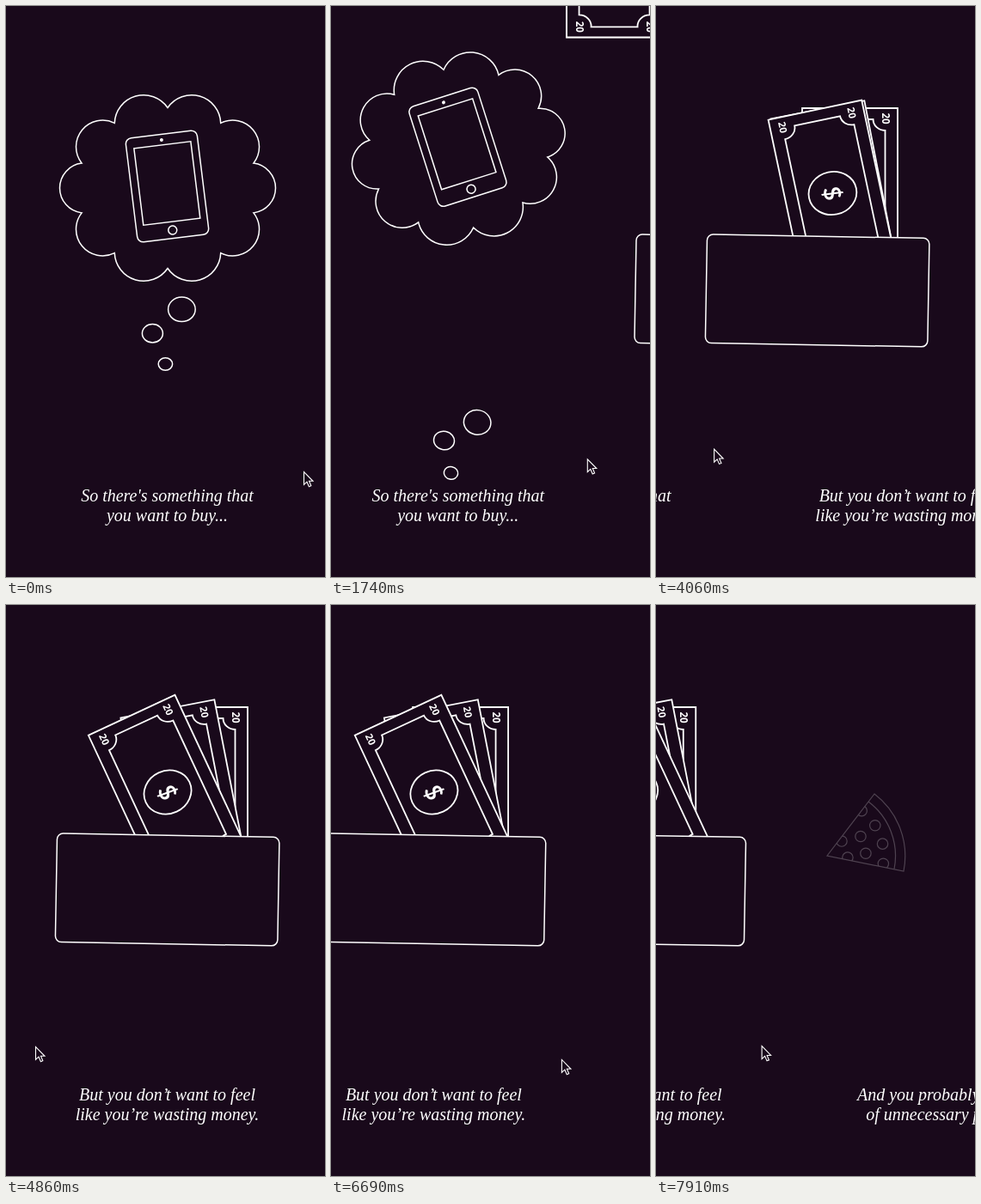
These frames come from a looping animation (371x665 px, 8 s). An HTML page:

```html
<!DOCTYPE html>
<html lang="en">
<head>
<meta charset="utf-8">
<title>Swipe walkthrough</title>
<style>
  html, body { margin: 0; height: 100%; overflow: hidden; background: #19091b; }
  svg { display: block; width: 100vw; height: 100vh; fill: #19091b; stroke: #fff; stroke-width: 1.5; }
  text { fill: #fff; stroke: none; text-anchor: middle; }
  .copy { font: italic 20px "Liberation Serif", "Noto Serif", serif; }
  .num { font: 700 11.5px "Open Sans", "Noto Sans", sans-serif; }
  .sign { font: 700 27px Lato, "Open Sans", sans-serif; }
</style>
</head>
<body>
<svg viewBox="0 0 371 665">
  <defs>
    <g id="bill" stroke-width="1.8">
      <path d="M-55.5-99h111v198h-111z"/>
      <path d="M-27-86H27A14 13 0 0 0 41-73V73A14 13 0 0 0 27 87H-27A14 13 0 0 0-41 73V-73A14 13 0 0 0-27-86Z"/>
      <ellipse rx="28" ry="25"/>
      <g transform="rotate(90)">
        <text class="sign" y="10">$</text>
        <text class="num" x="-87" y="-37">20</text>
        <text class="num" x="-87" y="45">20</text>
        <text class="num" x="87" y="-37">20</text>
        <text class="num" x="87" y="45">20</text>
      </g>
    </g>
    <clipPath id="slice"><path d="M0 0 55-72A91 91 0 0 1 89 18Z"/></clipPath>
  </defs>

  <!-- centred on its own origin -->
  <g id="cloud">
    <path id="puffs"/>
    <g transform="translate(-.5 -2) rotate(-7)">
      <rect x="-41.8" y="-61" width="83.6" height="122" rx="7"/>
      <rect x="-33" y="-48.5" width="66.5" height="90"/>
      <circle cy="-54.4" r="2" fill="#fff" stroke="none"/>
      <circle cy="51.4" r="5"/>
    </g>
  </g>
  <g id="bubbles">
    <ellipse cx="18" cy="-30.7" rx="15.8" ry="14.3"/>
    <ellipse cx="-16" cy="-2.7" rx="12" ry="10.7"/>
    <ellipse cx="-1" cy="33" rx="8.2" ry="7.3"/>
  </g>

  <use id="bill1" href="#bill"/>
  <use id="bill2" href="#bill"/>
  <use id="bill3" href="#bill"/>
  <g id="wallet"><rect x="-129.3" y="-63.3" width="258.5" height="126.5" rx="7" transform="rotate(1)"/></g>

  <g id="pizza" fill="none" stroke-width="1.2" transform="translate(199 292)">
    <path d="M0 0 55-72A91 91 0 0 1 89 18Z"/>
    <path d="M48-63A79 79 0 0 1 78 15.5"/>
    <g id="toppings" clip-path="url(#slice)"></g>
  </g>

  <g id="copy" class="copy"></g>
  <path id="cursor" d="M.5.5V15.5L4 12.2 6.400 17.700 8.800 16.700 6.500 11.300H11Z" stroke-width="1.1"/>
</svg>
<script>
const LOOP = 8000, PAGE = 375, RAD = Math.PI / 180;
const $ = id => document.getElementById(id);
const ramp = (v, from, to) => Math.max(0, Math.min(1, (v - from) / (to - from)));
const place = (id, x, y, turn = 0) =>
  $(id).setAttribute('transform', `translate(${x} ${y}) rotate(${turn})`);

// Ten puffs with their notches on an ellipse; the side puffs are tighter.
function cloudPath() {
  const notch = a => `${105 * Math.sin(a * RAD)} ${-93.5 * Math.cos(a * RAD)}`;
  let d = 'M' + notch(0);
  for (let a = 36; a <= 360; a += 36) {
    const r = 31.7 + 2.6 * Math.cos(2 * (a - 18) * RAD);
    d += `A${r} ${r} 0 0 1 ${notch(a)}`;
  }
  return d + 'Z';
}

// Toppings sit on rings around the tip of the slice.
function ring(r, start, step, count) {
  return Array.from({ length: count }, (_, i) => {
    const a = (start + i * step) * RAD;
    return `<circle cx="${r * Math.cos(a)}" cy="${r * Math.sin(a)}" r="6.2"/>`;
  }).join('');
}

const copy = [
  ['So there\'s something that', 'you want to buy...'],
  ['But you don’t want to feel', 'like you’re wasting money.'],
  ['And you probably buy plenty', 'of unnecessary purchases.']
];

$('puffs').setAttribute('d', cloudPath());
$('toppings').innerHTML = ring(24, -45, 50, 2) + ring(45, -30, 26.5, 2) + ring(66, -52.5, 20.2, 4);
$('copy').innerHTML = copy.map((lines, page) => lines.map((line, row) =>
  `<text x="${PAGE * (page + 0.5)}" y="${577 + 23 * row}">${line}</text>`).join('')).join('');

// Pointer moves: start, end, dx, dy
const moves = [
  [140, 430, 6, -14], [730, 1400, -39, 0], [1620, 2440, -103, -5], [2600, 4400, -176, -1 * 9 + 0],
  [4890, 5210, 254, -6], [5210, 5810, 63, 18], [6270, 6690, -83, 3], [6690, 8000, -156, -17]
];

function pointer(t) {
  let x = 346, y = 542;
  for (const [from, to, dx, dy] of moves) {
    const k = ramp(t, from, to);
    x += dx * k;
    y += dy * k;
  }
  return [x, y];
}

// Dragging follows the pointer; releasing eases to the next page.
function scrollAt(t, x) {
  if (t < 4400) return Math.max(0, 337.5 - x);
  if (t < 6080) return PAGE - 71 * (1 - ramp(t, 4400, 4840)) ** 3;
  return PAGE + Math.max(0, 336 - x);
}

function draw(t) {
  const [x, y] = pointer(t);
  const scroll = scrollAt(t, x), page = scroll / PAGE;
  const out = Math.max(0, scroll - PAGE);
  place('cursor', x, y);
  place('copy', -scroll, 0);

  const leave = (page / 0.106) ** 2;
  place('cloud', 188 - scroll, 212 - 46 * leave, -10.7 * leave);
  place('bubbles', 186.4 - scroll, 384 + 128 * leave, 10.9 * leave);

  const away = 1 - ramp(page, 0, 0.5);
  const fanA = ramp(page, 0.5, 0.7), fanB = ramp(page, 0.7, 1);
  const bill = (id, speed, shift, turn) =>
    place(id, 225.5 + 132 * away - shift - speed * out, 218 - 356 * away, turn);
  bill('bill1', 1.1, 0, 0);
  bill('bill2', 1.05, 18.75 * fanA, -11 * fanA);
  bill('bill3', 1, 18.75 * (fanA + fanB), -11 * fanA - 14 * fanB);
  place('wallet', 187.7 + PAGE * away - out, 331.5);

  $('pizza').setAttribute('opacity', ramp(page, 1.5, 1.8));
}

function tick() {
  draw(performance.now() % LOOP);
  requestAnimationFrame(tick);
}
tick();
</script>
</body>
</html>
```
